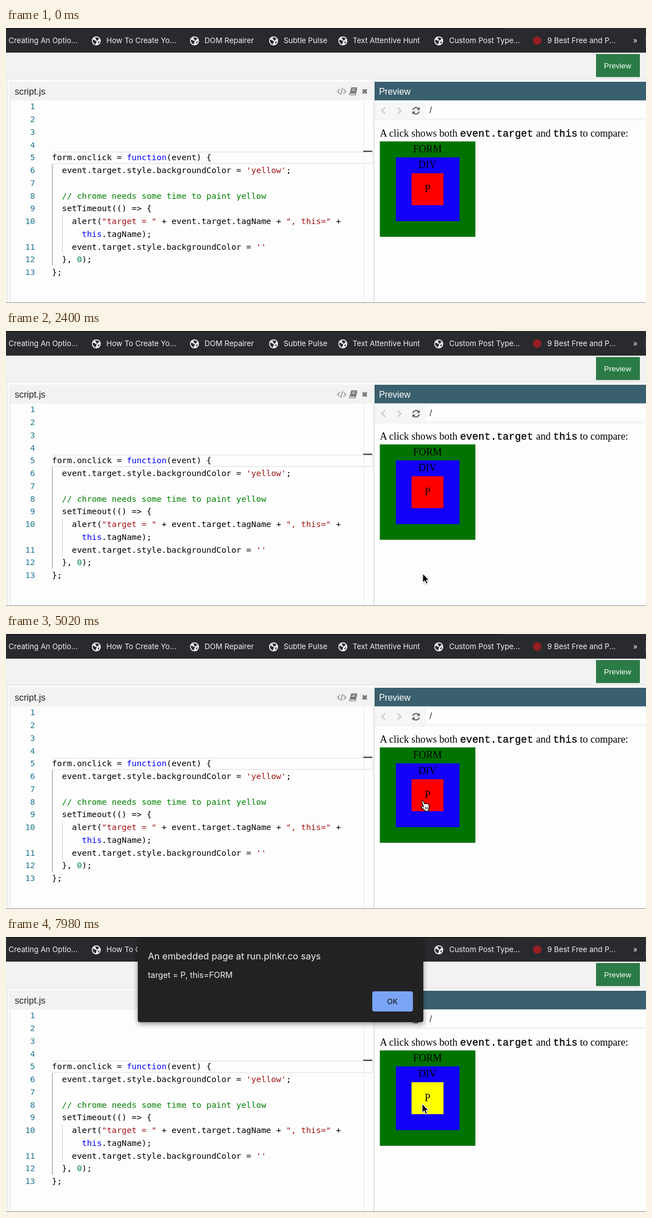
An HTML page for the animation above (8 s loop, 1141 px wide and 491 px high).

```html
<!DOCTYPE html>
<html lang="en">
<head>
<meta charset="utf-8">
<title>Click event preview</title>
<style>
  html, body { margin: 0; width: 100%; height: 100%; overflow: hidden; background: #fdfdfd; }
  svg { display: block; width: 1141px; height: 491px; }
  text { white-space: pre; }
  .ui { font: 13.3px Inter, sans-serif; fill: #f1f1f2; }
  .sans { font-family: "Liberation Sans", Arial, sans-serif; }
  .code { font: 14.75px "DejaVu Sans Mono", monospace; fill: #000; }
  .number { fill: #237893; text-anchor: end; }
  .keyword { fill: #0000ff; }
  .string { fill: #a31515; }
  .comment { fill: #008000; }
  .digit { fill: #098658; }
  .page { font: 18.1px "Liberation Serif", Times, serif; fill: #000; }
  .mono { font-family: "Liberation Mono", Courier, monospace; stroke: #000; stroke-width: .3; }
  .mid { text-anchor: middle; }
  .line { fill: none; stroke-linecap: round; stroke-linejoin: round; }
</style>
</head>
<body>
<svg viewBox="0 0 1141 491" xmlns="http://www.w3.org/2000/svg">
  <defs>
    <g id="globe">
      <circle r="8" fill="#f1f1f2"/>
      <path fill="#292a2d" d="M-6.2-1.8 Q-3.8-2.2-2.4-.6 L.3.2 Q1.4 1.8-.3 2.8 L-1 6.2 Q-5.6 4.6-6.4.6Z
        M-1.2-6.2 Q3.6-6.4 5.6-3 L3.4-2.8 2.6-.6-.4-1.4-.2-3.4-2-4.2Z M3 1.8 L6 .8 Q5.4 4 3.2 5.2Z"/>
    </g>
    <filter id="shadow" x="-10%" y="-10%" width="120%" height="135%">
      <feDropShadow dx="0" dy="3" stdDeviation="5" flood-opacity=".45"/>
    </filter>
    <filter id="soft" x="-50%" y="-50%" width="200%" height="200%">
      <feDropShadow dx="0" dy="1" stdDeviation=".8" flood-opacity=".35"/>
    </filter>
  </defs>

  <rect width="1141" height="491" fill="#fdfdfd"/>

  <!-- bookmarks -->
  <rect width="1141" height="44" fill="#292a2d"/>
  <path d="M0 0H887Q884 2 878 2H0Z" fill="#1b1c1f"/>
  <rect x="1139" y="13" width="2" height="19" fill="#3c3d40"/>
  <g id="bookmarks" class="ui"></g>
  <circle cx="947" cy="22.5" r="7.5" fill="#961f22"/>

  <!-- toolbar -->
  <rect y="44" width="1141" height="47" fill="#f2f2f2"/>
  <rect y="90.5" width="1141" height="1" fill="#d8d8d8"/>
  <rect y="91.5" width="1141" height="4.5" fill="#fafafa"/>
  <rect x="1052.5" y="47" width="77" height="40" fill="#2a7b45" stroke="#246b3c"/>
  <text class="sans mid" x="1090.3" y="72" font-size="13.6" fill="#fff">Preview</text>

  <!-- editor -->
  <rect y="96" width="7" height="395" fill="#f8f8f8"/>
  <path d="M2.5 92V491M7.5 96V491" stroke="#e4e4e4"/>
  <rect x="8" y="96" width="646" height="33.5" fill="#f2f2f2"/>
  <text class="sans" x="15.5" y="118.5" font-size="16.2" fill="#222">script.js</text>
  <g class="line" stroke="#858585" stroke-width="1.3">
    <path d="M595 109.5L591 113.2 595 117M602 109.5L606 113.2 602 117M600 107.5L597 119"/>
  </g>
  <path d="M615.5 106H626L623 117H612.5Z" fill="#777"/>
  <path d="M617 109H623M616.3 111.5H622.3" stroke="#eee"/>
  <path d="M612.5 117.3Q612 119.3 614 119.3H622.5L625.5 109" class="line" stroke="#777" stroke-width="1.3"/>
  <path d="M636 109.8L643 116.8M643 109.8L636 116.8" stroke="#777" stroke-width="3.4"/>
  <path d="M82 221.5H653M82 242H653" stroke="#e6e6e6" stroke-width="1.7"/>
  <path d="M637.5 130V491" stroke="#e8e8e8"/>
  <path d="M653 221V243" stroke="#e6e6e6"/>
  <rect x="637" y="219" width="16" height="2.2" fill="#424242"/>
  <path d="M82.5 243V424.5" stroke="#8f8f8f"/>
  <path d="M100.5 334V402" stroke="#d0d0d0"/>
  <g id="code" class="code"></g>
  <rect x="654" y="96" width="3" height="395" fill="#f3f3f3"/>
  <path d="M656.5 129V491" stroke="#d8d8d8"/>

  <!-- preview pane -->
  <rect x="657" y="96" width="484" height="33.5" fill="#3a5f6e"/>
  <text class="sans" x="665" y="118.5" font-size="15.8" fill="#fff">Preview</text>
  <rect x="657" y="129.5" width="484" height="35.5" fill="#fdfdfd"/>
  <rect x="657" y="133" width="92" height="28" fill="#f6f6f6"/>
  <path d="M657 163H1141" stroke="#f4f4f4" stroke-width="4"/>
  <path d="M676 142L670 147.5 676 153M698 142L704 147.5 698 153" fill="none" stroke="#c9c9c9" stroke-width="2.3"/>
  <g fill="none" stroke="#5e5e5e" stroke-width="2">
    <path d="M725.4 146.5A5.8 5.8 0 0 1 735.5 144M736.6 149A5.8 5.8 0 0 1 726.5 151.5"/>
  </g>
  <path d="M737.6 141V146.4H732.2ZM724.4 154.5V149.1H729.8Z" fill="#5e5e5e"/>
  <text class="sans" x="755" y="152" font-size="16" fill="#333">/</text>

  <g class="page">
    <text x="666.5" y="193.5">A click shows both</text>
    <text class="mono" x="809.5" y="193.5">event.target</text>
    <text x="945" y="193.5">and</text>
    <text class="mono" x="975.5" y="193.5">this</text>
    <text x="1023.3" y="193.5">to compare:</text>
    <rect x="666.5" y="202.5" width="170.3" height="170.3" fill="#007300"/>
    <rect x="695" y="231" width="113.5" height="113.8" fill="#1200fa"/>
    <rect id="target" x="723" y="259.3" width="57" height="57"/>
    <text class="mid" x="751.5" y="222">FORM</text>
    <text class="mid" x="751.5" y="250.3">DIV</text>
    <text class="mid" x="751.5" y="293.3">P</text>
  </g>
  <rect y="490" width="1141" height="1" fill="#8c8c8c"/>

  <g id="dialog">
    <rect x="235" y="3" width="509" height="149" rx="4" fill="#202124" filter="url(#shadow)"/>
    <text class="ui" x="253" y="39.7" style="font-size:16.4px">An embedded page at run.plnkr.co says</text>
    <text class="ui" x="253" y="72.7" style="font-size:14.5px">target = P, this=FORM</text>
    <rect x="653" y="97" width="72.5" height="36" rx="4" fill="#7aa5f7"/>
    <text class="ui mid" x="689" y="119.5" style="fill:#202124;font-weight:500">OK</text>
  </g>

  <g id="pointer" filter="url(#soft)">
    <path id="arrow" d="M0 0V16.5L3.7 13 6.1 18.6 8.9 17.4 6.5 12H11.5Z" fill="#000" stroke="#fff" stroke-width="1.1"/>
    <g id="hand">
      <path class="line" style="fill:#fff" stroke="#000" stroke-width="1.1"
        d="M2.5 11.5L-.6 2.2Q-.9.4.5.2 1.7 0 2.2 1.4L4 6Q4.7 4.4 6.5 5.8 7.5 4.5 9 6 10.8 5 11.6 7.2L12.4 11 11.8 14.6 11 18.5H4.5L3.8 16.4-.6 12.8Q-2.6 10.5-1.2 9.8 0 9.3 2.5 11.5Z"/>
      <path d="M5.6 11V15.5M7.7 11V15.5M9.8 11V15.5" stroke="#000" stroke-width=".9"/>
    </g>
  </g>
</svg>
<script>
  const LOOP = 8000;
  const PAINTED = 6060;
  const ALERTED = 6860;
  const FORM_BOTTOM = 373;
  const ROW = 22.75;
  const CHAR = 8.88;
  const $ = id => document.getElementById(id);

  const bookmarks = [
    [4.5, 'Creating An Optio...'], [179, 'How To Create Yo...', 161], [354, 'DOM Repairer', 336],
    [495, 'Subtle Pulse', 477], [618, 'Text Attentive Hunt', 600.5],
    [790, 'Custom Post Type...', 771.5], [965, '9 Best Free and P...'], [1118, '»']
  ];
  $('bookmarks').innerHTML = bookmarks.map(([x, label, icon]) =>
    (icon ? `<use href="#globe" x="${icon}" y="23"/>` : '') + `<text x="${x}" y="27.3">${label}</text>`).join('');

  const paint = (kind, text) => `<tspan class="${kind}">${text}</tspan>`;
  const keyword = text => paint('keyword', text);
  const string = text => paint('string', text);

  // Each row: line number, indent in characters, markup.
  const rows = [
    [1], [2], [3], [4],
    [5, 0, `form.onclick = ${keyword('function')}(event) {`],
    [6, 2, `event.target.style.backgroundColor = ${string("'yellow'")};`],
    [7],
    [8, 2, paint('comment', '// chrome needs some time to paint yellow')],
    [9, 2, 'setTimeout(() =&gt; {'],
    [10, 4, `alert(${string('"target = "')} + event.target.tagName + ${string('", this="')} +`],
    ['', 6, `${keyword('this')}.tagName);`],
    [11, 4, `event.target.style.backgroundColor = ${string("''")}`],
    [12, 2, `}, ${paint('digit', '0')});`],
    [13, 0, '};']
  ];
  $('code').innerHTML = rows.map(([number, indent = 0, markup = ''], i) => {
    const y = 145.4 + i * ROW;
    return `<text class="number" x="52" y="${y}">${number}</text>` +
      `<text x="${82 + indent * CHAR}" y="${y}">${markup}</text>`;
  }).join('');

  // Pointer path: time, x, y.
  const path = [
    [1960, 746, 496], [2400, 743, 433], [3240, 742, 332],
    [3800, 741.5, 312], [4080, 742, 303], [4500, 742, 297.5]
  ];

  function pointerAt(t) {
    const next = path.findIndex(([time]) => time > t);
    if (next < 0) return path[path.length - 1].slice(1);
    if (next === 0) return path[0].slice(1);
    const [t0, x0, y0] = path[next - 1], [t1, x1, y1] = path[next];
    const k = (t - t0) / (t1 - t0);
    return [x0 + (x1 - x0) * k, y0 + (y1 - y0) * k];
  }

  const show = (id, visible) => $(id).setAttribute('display', visible ? 'inline' : 'none');

  function render(t) {
    const [x, y] = pointerAt(t);
    const clicked = t >= PAINTED;
    const hovering = y < FORM_BOTTOM && !clicked;
    $('pointer').setAttribute('transform', `translate(${x} ${y})`);
    show('pointer', t >= path[0][0]);
    show('hand', hovering);
    show('arrow', !hovering);
    $('target').setAttribute('fill', clicked ? '#ffff00' : '#fe0000');
    show('dialog', t >= ALERTED);
  }

  const start = performance.now();
  function tick() {
    render((performance.now() - start) % LOOP);
    requestAnimationFrame(tick);
  }
  tick();
</script>
</body>
</html>
```
